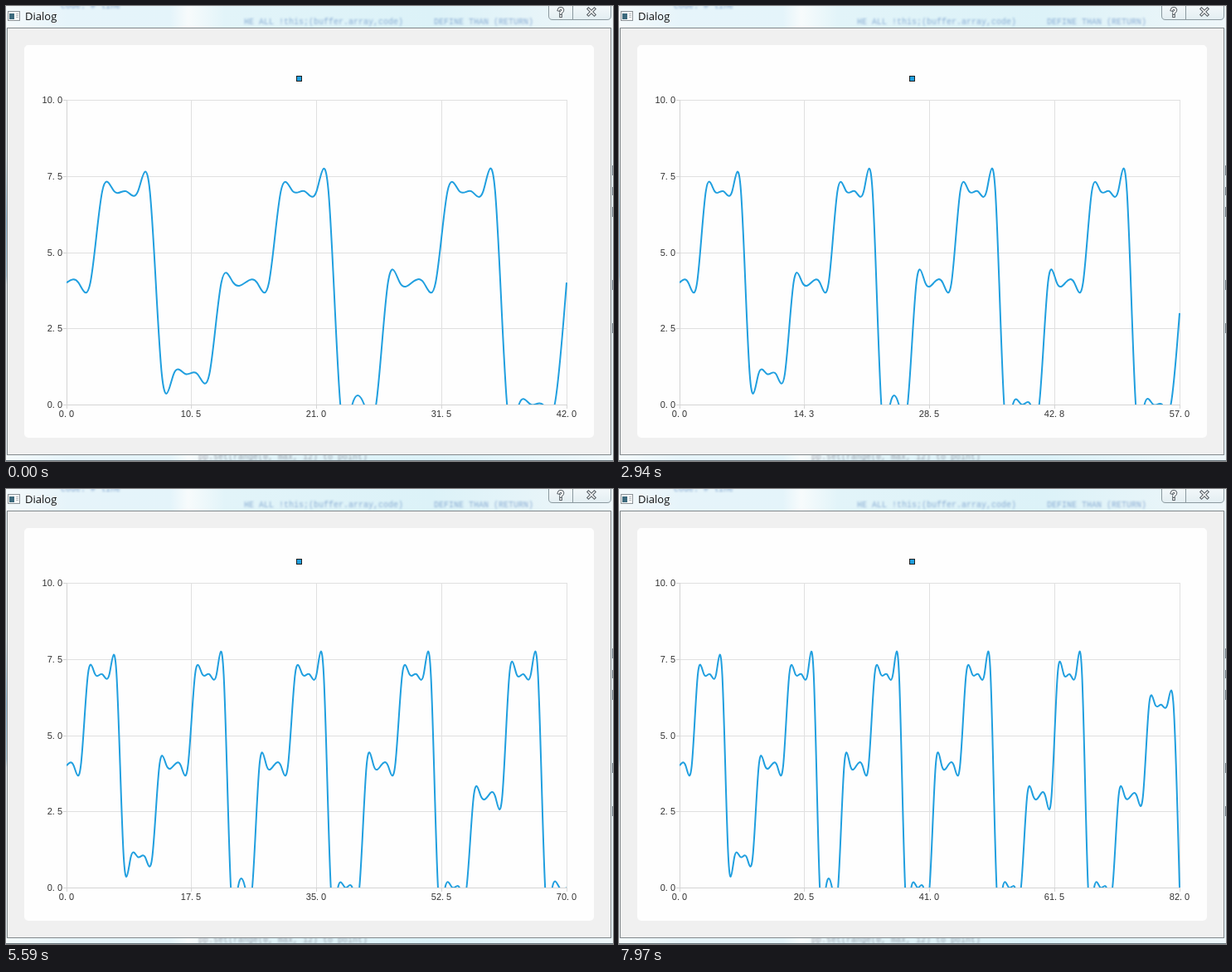
Animation of 732 by 548 pixels, one loop 8 s. Source, as an HTML page:

```html
<!DOCTYPE html>
<html lang="en">
<head>
<meta charset="utf-8">
<title>Dialog</title>
<style>
  html, body { margin: 0; width: 100%; height: 100%; overflow: hidden; background: #f0f0f0; }
  svg { display: block; width: 732px; height: 548px; }
  .label { font: 11px "Liberation Sans", Arial, sans-serif; fill: #303030; }
  .title { font: 13px "Open Sans", sans-serif; fill: #111; }
  .behind { font: 10px "Liberation Mono", monospace; fill: #5a86c0; }
</style>
</head>
<body>
<svg viewBox="0 0 732 548" xmlns="http://www.w3.org/2000/svg">
  <defs>
    <linearGradient id="glass">
      <stop offset="0" stop-color="#f4f9fb"/>
      <stop offset=".1" stop-color="#e6f4fa"/>
      <stop offset=".27" stop-color="#e4f4fa"/>
      <stop offset=".3" stop-color="#f7fbfc"/>
      <stop offset=".36" stop-color="#e2f4f9"/>
      <stop offset=".7" stop-color="#dcf2f8"/>
      <stop offset="1" stop-color="#eef6f9"/>
    </linearGradient>
    <linearGradient id="side" x2="0" y2="1">
      <stop offset=".3" stop-color="#e4f0f5"/>
      <stop offset=".45" stop-color="#9cc4e0"/>
      <stop offset=".58" stop-color="#b4d2e6"/>
      <stop offset=".6" stop-color="#e8f1f5"/>
    </linearGradient>
    <linearGradient id="button" x2="0" y2="1">
      <stop offset="0" stop-color="#f3f8fa"/>
      <stop offset="1" stop-color="#e3eef2"/>
    </linearGradient>
    <filter id="blur" x="-10%" y="-100%" width="120%" height="300%"><feGaussianBlur stdDeviation="1.3"/></filter>
    <clipPath id="plot"><rect x="73" y="113" width="604" height="367"/></clipPath>
  </defs>

  <!-- window frame -->
  <rect width="732" height="548" fill="url(#glass)"/>
  <rect y="27" width="2" height="514" fill="url(#side)"/>
  <rect x="730" y="27" width="2" height="514" fill="#e3eff4"/>
  <path d="M731.5 192v12m0 14v10m0 14v12m0 76v12m0 40v12" stroke="#6c7880"/>
  <g class="behind" filter="url(#blur)">
    <text x="66" y="3" opacity=".7">code.  #  line</text>
    <text x="287" y="22" opacity=".65">HE ALL !this;(buffer.array,code)</text>
    <text x="516" y="22" opacity=".65">DEFINE THAN (RETURN)</text>
    <text x="232" y="546" opacity=".6" fill="#667">pp.set(range(0, max, 12) to point)</text>
  </g>
  <path d="M0 547.5H732" stroke="#69757c"/>

  <!-- title bar -->
  <rect x="2.5" y="6.5" width="14" height="11" fill="#f8f8f8" stroke="#8d9499"/>
  <rect x="4" y="9" width="6" height="7" fill="#3d6a7d"/>
  <path d="M12 9.5h3M12 11.5h3M12 13.5h3" stroke="#b8bec2"/>
  <text class="title" x="23" y="17">Dialog</text>
  <path d="M654.5 -1V12q0 4.500 4.500 4.500H725q4.500 0 4.500-4.500V-1z" fill="url(#button)" stroke="#8b999f"/>
  <path d="M683.500 0V16" stroke="#8b999f"/>
  <g fill="none" stroke-linecap="square">
    <g stroke="#555d63" stroke-width="3.6">
      <path id="help" d="M666.500 4.700q.5-2 2.500-2t2.500 2q0 1.500-1.500 2.300-1 .6-1 1.800m0 3.200v.1"/>
      <path id="close" d="M702.500 3.500l7 7m0-7l-7 7"/>
    </g>
    <g stroke="#fff" stroke-width="1.5"><use href="#help" style="stroke:#fff"/>
      <path d="M666.500 4.700q.5-2 2.500-2t2.500 2q0 1.500-1.500 2.300-1 .6-1 1.800m0 3.200v.1M702.500 3.500l7 7m0-7l-7 7"/>
    </g>
  </g>

  <!-- client area -->
  <rect x="1.500" y="26.500" width="728" height="514" fill="#f0f0f0" stroke="#83898c"/>
  <rect x="22" y="47" width="687" height="473" rx="5" fill="#fefefe"/>
  <rect x="350.500" y="84.500" width="6" height="6" fill="#209fdf" stroke="#202020"/>
  <path id="grid" stroke="#e0e0e0" fill="none"/>
  <path id="axes" stroke="#d4d4d4" fill="none"/>
  <g id="labels"></g>
  <path id="curve" fill="none" stroke="#209fdf" stroke-width="2" stroke-linejoin="round" clip-path="url(#plot)"/>
</svg>

<script>
const LEFT = 73, TOP = 113, WIDTH = 603, HEIGHT = 367, BOTTOM = TOP + HEIGHT;
const LOOP = 8000, FIRST_COUNT = 42;

// Plateaus of the signal: [level, samples]
const samples = [
  [4, 3], [7, 5], [1, 5], [4, 5], [7, 5], [0, 4], [4, 5], [7, 5], [0, 5],
  [4, 5], [7, 5], [0, 5], [3, 5], [7, 5], [0, 5], [3, 5], [6, 5], [0, 1]
].flatMap(([level, count]) => Array(count).fill(level));

// Moments at which a sample arrives, in hundredths of a second
const arrivals = [
  15, 31, 54, 78, 93, 116, 131, 155, 178, 194, 217, 233, 256, 279, 294, 317, 333, 357, 372, 395,
  418, 434, 457, 472, 495, 519, 534, 557, 573, 596, 619, 635, 658, 673, 696, 720, 736, 759, 774, 797
];

const byId = id => document.getElementById(id);

function addLabel(x, y, anchor) {
  const text = document.createElementNS("http://www.w3.org/2000/svg", "text");
  text.setAttribute("class", "label");
  text.setAttribute("x", x);
  text.setAttribute("y", y);
  text.setAttribute("text-anchor", anchor);
  byId("labels").append(text);
  return text;
}

function setNumber(label, value) {
  const [whole, decimal] = value.toFixed(1).split(".");
  label.innerHTML = `${whole}.<tspan dx="3">${decimal}</tspan>`;
}

const xLabels = [];
let grid = "", axes = `M${LEFT + .5} ${TOP}V${BOTTOM}M${LEFT} ${BOTTOM + .5}H${LEFT + WIDTH + 1}`;
for (let i = 0; i <= 4; i++) {
  const x = Math.floor(LEFT + WIDTH * i / 4) + .5;
  const y = Math.round(BOTTOM - HEIGHT * i / 4) + .5;
  grid += `M${x} ${TOP}V${BOTTOM}M${LEFT} ${y}H${LEFT + WIDTH + 1}`;
  axes += `M${x} ${BOTTOM}v5M${LEFT} ${y}h-4`;
  xLabels.push(addLabel(x - .5, 495, "middle"));
  setNumber(addLabel(68, y + 3.5, "end"), i * 2.5);
}
byId("grid").setAttribute("d", grid);
byId("axes").setAttribute("d", axes);

// Second derivatives of the natural cubic spline with unit spacing
function bends(y) {
  const last = y.length - 1, ratio = [0], rest = [0], bend = Array(last + 1).fill(0);
  for (let i = 1; i < last; i++) {
    const pivot = 4 - ratio[i - 1];
    ratio[i] = 1 / pivot;
    rest[i] = (6 * (y[i + 1] - 2 * y[i] + y[i - 1]) - rest[i - 1]) / pivot;
  }
  for (let i = last - 1; i > 0; i--) bend[i] = rest[i] - ratio[i] * bend[i + 1];
  return bend;
}

function splinePath(y) {
  const last = y.length - 1, bend = bends(y);
  const point = (x, v) =>
    `${(LEFT + x / last * WIDTH).toFixed(2)} ${(BOTTOM - v / 10 * HEIGHT).toFixed(2)}`;
  let path = "M" + point(0, y[0]);
  for (let i = 0; i < last; i++) {
    const rise = y[i + 1] - y[i];
    const slopeIn = rise - (2 * bend[i] + bend[i + 1]) / 6;
    const slopeOut = rise + (bend[i] + 2 * bend[i + 1]) / 6;
    path += `C${point(i + 1 / 3, y[i] + slopeIn / 3)} ` +
      `${point(i + 2 / 3, y[i + 1] - slopeOut / 3)} ${point(i + 1, y[i + 1])}`;
  }
  return path;
}

let shown = -1;
function draw() {
  const time = performance.now() % LOOP;
  const count = FIRST_COUNT + arrivals.filter(t => t * 10 <= time).length;
  if (count !== shown) {
    shown = count;
    byId("curve").setAttribute("d", splinePath(samples.slice(0, count + 1)));
    xLabels.forEach((label, i) => setNumber(label, count * i / 4));
  }
  requestAnimationFrame(draw);
}
draw();
</script>
</body>
</html>
```
